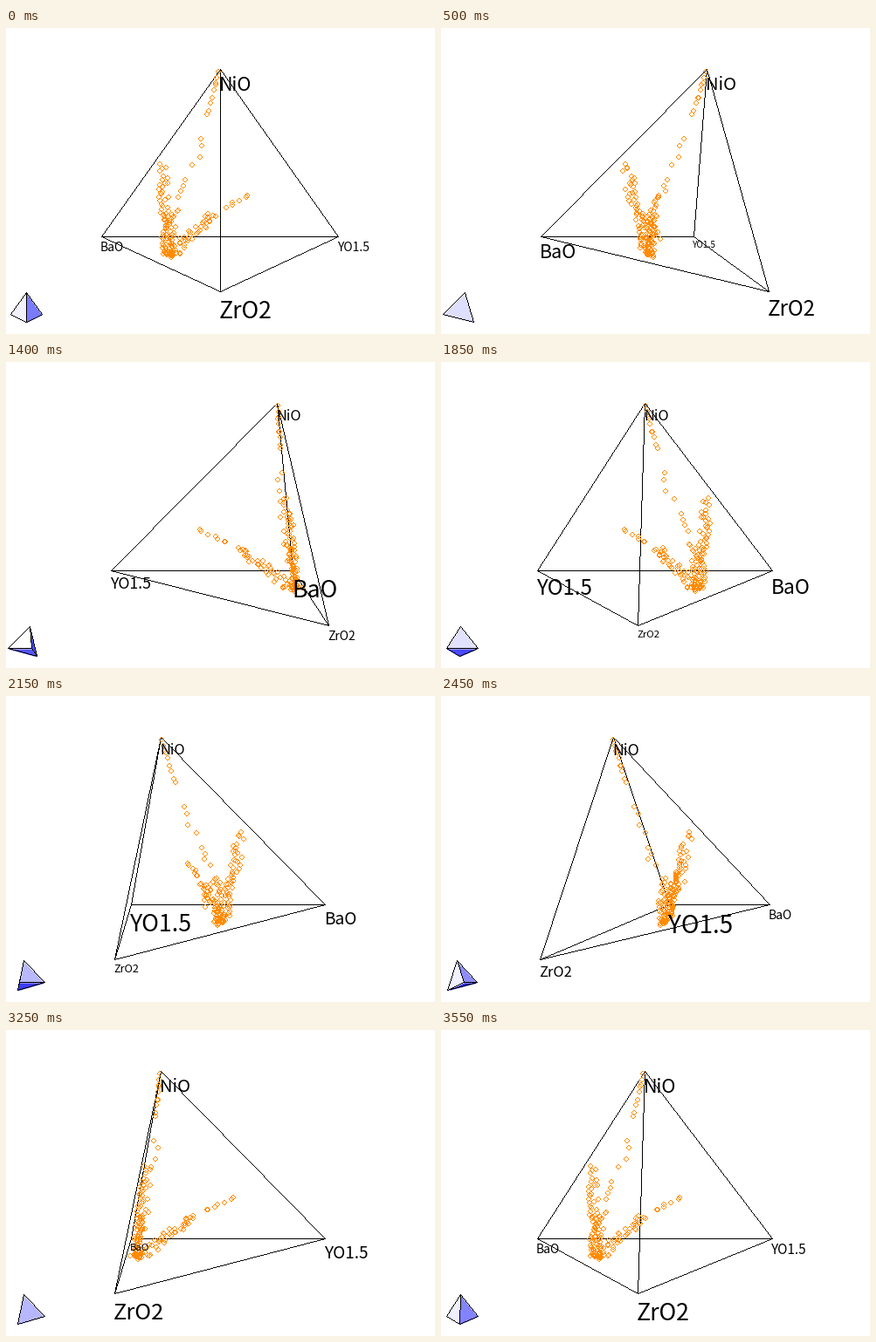
Recreate the animation shown at these times as a matplotlib script. Size 491 by 351 pixels, loop 3600 ms.

```python
import numpy as np
import matplotlib.pyplot as plt
from matplotlib.animation import FuncAnimation
from itertools import combinations

W, H, DPI = 491, 351, 64
PX = 72 / DPI            # points per pixel
FRAMES, INTERVAL = 72, 50
CENTER_X = 244.5

# Regular tetrahedron: two corners on a horizontal edge, two above and below it.
SIDE, TOP, MIDDLE = 271, 48, 240.4
RISE = MIDDLE - TOP
HEIGHT = SIDE * np.sqrt(3) / 2
APEX_Z = np.sqrt(HEIGHT ** 2 - RISE ** 2)
FRONT_Z = SIDE * np.sqrt(2 / 3) * RISE / HEIGHT + APEX_Z / 3
FRONT_Y = TOP + np.sqrt(SIDE ** 2 - (FRONT_Z - APEX_Z) ** 2)
CENTROID_Z = (APEX_Z + FRONT_Z) / 4

# Columns: x, screen y, depth towards the viewer.
CORNERS = np.array([(0, TOP, APEX_Z), (-SIDE / 2, MIDDLE, 0),
                    (SIDE / 2, MIDDLE, 0), (0, FRONT_Y, FRONT_Z)])
NAMES = ["NiO", "BaO", "YO1.5", "ZrO2"]
EDGES = list(combinations(range(4), 2))
FACES = list(combinations(range(4), 3))
LIGHT = np.array([-1, 1, 1]) / np.sqrt(3)

ICON_X, ICON_Y, ICON_SCALE = 23, 304, 0.132

rng = np.random.default_rng(11)


def strand(n, start, end, spread, power=1):
    """Points spaced with some jitter along a line and scattered around it."""
    t = ((np.arange(n) + rng.random(n)) / n)[:, None] ** power
    noise = rng.uniform(-1, 1, (n, 3)) * (spread, spread / 3, spread)
    return np.array(start) + t * np.subtract(end, start) + noise


POINTS = np.vstack([
    strand(10, (-1, 50, 134), (-14, 102, 124), 1),
    strand(8, (-18, 126, 118), (-46, 204, 103), 5),
    strand(7, (33, 193, 33), (2, 209, 53), 2),
    strand(40, (-8, 214, 57), (-55, 261, 96), 8),
    strand(62, (-67, 152, 68), (-59, 263, 97), 6, power=0.7),
    strand(22, (-52, 208, 94), (-58, 262, 98), 5),
    strand(10, (-61, 258, 97), (-55, 264, 97), 3),
])

# Pixels of a small circle outline.
GRID = np.array([(i, j) for i in range(-3, 3) for j in range(-3, 3)])
RADII = np.hypot(*(GRID + 0.5).T)
RING = GRID[(RADII > 2) & (RADII < 2.7)]


def rotate(v, angle):
    x, y, z = v.T
    c, s = np.cos(angle), np.sin(angle)
    return np.column_stack([x * c + z * s, y, z * c - x * s])


def snap(v):
    return np.floor(v + 0.5)


def pixel_line(a, b):
    steps = int(np.abs(b - a).max())
    return snap(np.linspace(a, b, steps + 1))


def outward_normals():
    """Unit normal of each face, pointing away from the opposite corner."""
    rel = (CORNERS - CORNERS.mean(axis=0)) * (1, -1, 1)
    rel /= np.linalg.norm(rel, axis=1)[:, None]
    return np.array([-rel[6 - sum(f)] for f in FACES])


NORMALS = outward_normals()

fig = plt.figure(figsize=(W / DPI, H / DPI), dpi=DPI, facecolor="white")
ax = fig.add_axes([0, 0, 1, 1])
ax.set_xlim(0, W)
ax.set_ylim(H, 0)
ax.axis("off")

# Single-pixel markers keep the outlines crisp and one pixel wide.
wires, = ax.plot([], [], ",", color="black", zorder=2)
dots, = ax.plot([], [], ",", color="#ff8c00", zorder=3)
labels = [ax.text(0, 0, name, family="Noto Sans CJK JP", color="black",
                  ha="left", va="baseline", zorder=4) for name in NAMES]
icon_faces = [ax.add_patch(plt.Polygon(np.zeros((3, 2)), lw=0, zorder=1))
              for _ in FACES]


def draw_icon(corners, angle):
    """Place the shaded faces and return the outlines of the visible ones."""
    x = ICON_X + (corners[:, 0] - CENTROID_Z * np.sin(angle)) * ICON_SCALE
    y = ICON_Y + (corners[:, 1] - TOP) * ICON_SCALE
    xy = snap(np.column_stack([x, y]))
    outlines = []
    for face, ids, normal in zip(icon_faces, FACES, rotate(NORMALS, angle)):
        visible = normal[2] > 0
        face.set_visible(visible)
        face.set_xy(xy[list(ids)] + 0.5)
        shade = np.clip((1 + normal @ LIGHT) / 2, 0, 1)
        face.set_facecolor((shade, shade, 1))
        if visible:
            outlines += [pixel_line(xy[a], xy[b]) for a, b in combinations(ids, 2)]
    return outlines


def draw(i):
    angle = 2 * np.pi * i / FRAMES
    corners = rotate(CORNERS, angle)
    # The solid stays centred on its horizontal extent.
    shift = CENTER_X - (corners[:, 0].min() + corners[:, 0].max()) / 2
    xy = snap(corners[:, :2] + (shift, 0))

    lines = [pixel_line(xy[a], xy[b]) for a, b in EDGES]
    wires.set_data(*np.vstack(lines + draw_icon(corners, angle)).T)

    centers = snap(rotate(POINTS, angle)[:, :2] + (shift, 0))
    dots.set_data(*(centers[:, None] + RING).reshape(-1, 2).T)

    # Nearer corners get larger labels, in whole font sizes.
    depth = corners[:, 2] - CENTROID_Z * np.cos(angle)
    for label, (x, y), d in zip(labels, xy, depth):
        size = np.floor(15.4 + 0.0415 * d) * 4 / 3
        label.set_fontsize(size * 0.95 * PX)
        label.set_position((x - 1, y + 1.079 * size))

    return [wires, dots, *labels, *icon_faces]


anim = FuncAnimation(fig, draw, frames=FRAMES, interval=INTERVAL,
                     repeat=True, repeat_delay=0, blit=False)
plt.show()
```
